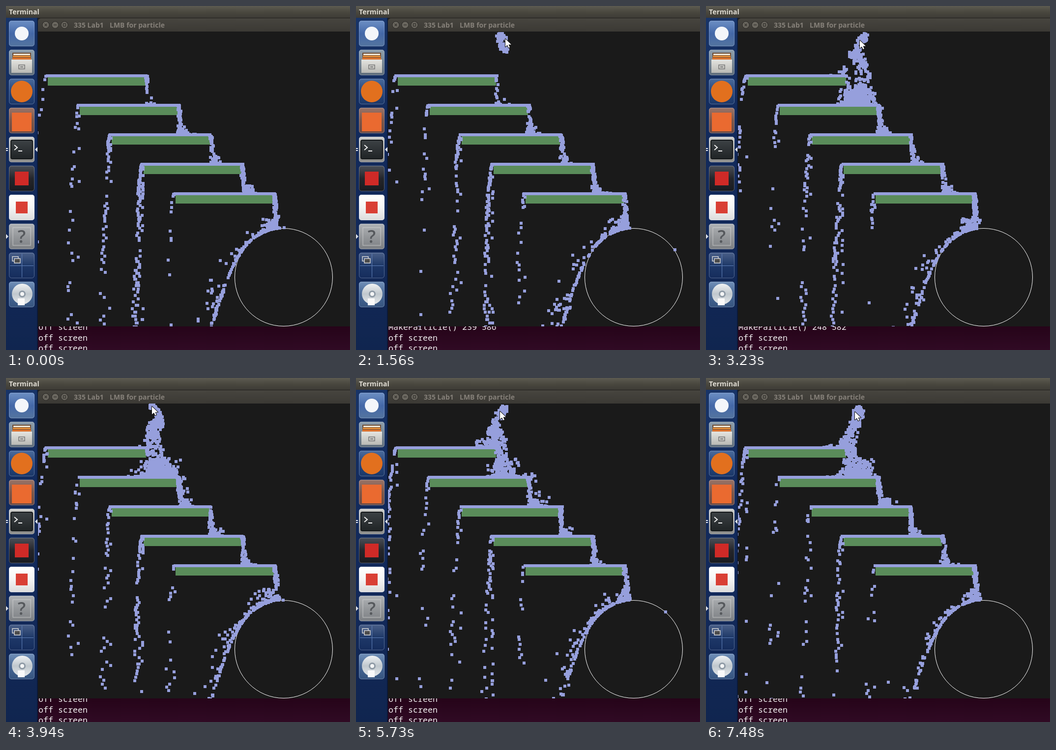
Animation of 700 by 700 pixels, one loop 7.52 s. Source, as an HTML page with a canvas:

```html
<!DOCTYPE html>
<html lang="en">
<head>
<meta charset="utf-8">
<title>Particle waterfall</title>
<style>
html, body { margin: 0; width: 100%; height: 100%; overflow: hidden; background: #1a1a1a; }
canvas { display: block; }
</style>
</head>
<body>
<canvas id="stage" width="700" height="700"></canvas>
<script>
const LOOP = 7520, FRAMES = 126, STEP = 59.84;
const UI = '"Open Sans", "Noto Sans", sans-serif';
const MONO = '"Noto Sans Mono", "DejaVu Sans Mono", monospace';
const WATER = '#969fdc';
const ctx = document.getElementById('stage').getContext('2d');

// ---------- helpers ----------
let seed = 335;
function rnd(a = 0, b = 1) {
  seed = (seed + 0x6D2B79F5) | 0;
  let t = Math.imul(seed ^ (seed >>> 15), 1 | seed);
  t = (t + Math.imul(t ^ (t >>> 7), 61 | t)) ^ t;
  return a + (b - a) * (((t ^ (t >>> 14)) >>> 0) / 4294967296);
}
const mix = (a, b, u) => a + (b - a) * u;
const clamp = u => Math.max(0, Math.min(1, u));
function rect(g, x, y, w, h, fill) { g.fillStyle = fill; g.fillRect(x, y, w, h); }
function disc(g, x, y, r, fill) {
  g.fillStyle = fill;
  g.beginPath(); g.arc(x, y, r, 0, 7); g.fill();
}
function poly(g, pts, fill) {
  g.fillStyle = fill;
  g.beginPath();
  pts.forEach(([x, y]) => g.lineTo(x, y));
  g.closePath(); g.fill();
}
function fade(g, y0, y1, ...colors) {
  const f = g.createLinearGradient(0, y0, 0, y1);
  colors.forEach((c, i) => f.addColorStop(i / (colors.length - 1), c));
  return f;
}
function text(g, s, x, y, font, fill) {
  g.font = font; g.fillStyle = fill; g.fillText(s, x, y);
}

// ---------- scene ----------
// particles per frame over each edge, at the start and end of the loop
const flows = [
  { left: [0.6, 3], right: [1.2, 1.5] },
  { left: [1.2, 0.7], right: [8, 8] },
  { left: [2.5, 0.9], right: [4, 6] },
  { left: [6, 1.6], right: [7, 6] },
  { left: [0.9, 0.5], right: [9, 6] }
];
const boxes = flows.map((flow, i) => ({ ...flow, l: 85 + 65 * i, r: 285 + 65 * i, top: 142 + 60 * i }));
const ball = { x: 565, y: 552, r: 99.5 };

// pointer tip: frame, x, y; it sways between these points while pouring
const POUR_FROM = 22;
const path = [
  [10, 303, -20], [14, 303, 0], [POUR_FROM, 303, 75], [38, 307, 93],
  [54, 313, 70], [78, 281, 98], [96, 293, 68], [125, 303, 69]
];
function pointer(f) {
  const i = Math.max(1, path.findIndex(p => p[0] >= f));
  const [f0, x0, y0] = path[i - 1], [f1, x1, y1] = path[i];
  const u = clamp((f - f0) / (f1 - f0));
  const p = { x: mix(x0, x1, u), y: mix(y0, y1, u) };
  if (f > POUR_FROM) {
    p.x -= 11 * Math.sin(4 * Math.PI * u);
    p.y = Math.max(58, p.y - 26 * Math.sin(3 * Math.PI * u) ** 2);
  }
  return p;
}

// ---------- simulation, recorded once ----------
const SUB = 4, DT = 1 / SUB, GRAVITY = 1.35;
let drops = [];

function spawn(rate, make) {
  for (let n = Math.floor(rate * DT + rnd()); n > 0; n--) drops.push(make());
}
const surge = (i, f) => 1 + 0.45 * Math.sin(f * 0.53 + i * 2.1) + 0.35 * Math.sin(f * 1.37 + i * 4.3);

function emit(f) {
  const u = clamp(f / FRAMES);
  boxes.forEach((b, i) => {
    const y = b.top + 0.2;
    const drift = (i ? 0.65 : 1.05) + 0.15 * Math.sin(f * 0.31 + i);
    spawn(mix(...b.left, u) * surge(i, f), () => {
      const stray = rnd() < 0.15;
      return { x: b.l - (stray ? 1 : 3), y, vx: stray ? rnd(-0.15, 0) : -drift + rnd(-0.3, 0.3), vy: 0 };
    });
    const push = 0.55 + 0.2 * Math.sin(f * 0.23 + i * 1.7);
    spawn(mix(...b.right, u) * surge(i + 5, f), () =>
      ({ x: b.r + rnd(-2, 2.5), y, vx: push + rnd(-0.45, 0.45), vy: 0 }));
  });
  if (f >= POUR_FROM) {
    const p = pointer(f);
    spawn(28, () => ({
      x: p.x + rnd(-4, 4), y: p.y + rnd(-4, 4),
      vx: rnd(-1.3, 1.4), vy: rnd(-0.8, 0.8), poured: true
    }));
  }
}

function hitBox(p, b) {
  p.y = b.top;
  p.vy *= -rnd(0.12, 0.54);
  p.vx += p.poured ? rnd(-1.9, 1.7) : rnd(-0.4, 1.6);
  return p.vy < -1.5;
}

function hitBall(p) {
  const dx = p.x - ball.x, dy = p.y - ball.y, d = Math.hypot(dx, dy);
  if (d >= ball.r + 1) return;
  const nx = dx / d, ny = dy / d, vn = p.vx * nx + p.vy * ny;
  p.x = ball.x + nx * (ball.r + 1);
  p.y = ball.y + ny * (ball.r + 1);
  if (vn >= 0) return;
  const k = (1 + rnd(0.15, 0.62)) * vn;
  p.vx -= k * nx;
  p.vy -= k * ny;
  if (vn < -2) p.vx += rnd(-1.5, 1);
}

function move(p) {
  const y0 = p.y;
  p.vy += GRAVITY * DT;
  p.x += p.vx * DT;
  p.y += p.vy * DT;
  const b = boxes.find(b => y0 <= b.top && p.y > b.top && p.x > b.l - 3 && p.x < b.r + 3);
  if (b && !hitBox(p, b)) return false;
  hitBall(p);
  return p.y < 656 && p.x > 61 && p.x < 704;
}

const film = [];
for (let f = -80; f < FRAMES; f++) {
  for (let s = 1; s <= SUB; s++) {
    emit(f - 1 + s * DT);
    drops = drops.filter(move);
  }
  if (f >= 0) film.push(drops.map(p => [Math.round(p.x) - 3, Math.round(p.y) - 3]));
}

// ---------- desktop ----------
function tile(g, y, ...colors) {
  g.beginPath(); g.roundRect(6, y, 52, 52, 5);
  g.fillStyle = fade(g, y, y + 52, ...colors); g.fill();
  g.strokeStyle = 'rgba(200,215,240,.35)';
  g.lineWidth = 1;
  g.beginPath(); g.roundRect(6.5, y + 0.5, 51, 51, 5); g.stroke();
}

function launcher(g) {
  rect(g, 0, 24, 65, 676, fade(g, 24, 700, '#183468', '#122a5c', '#12295a', '#10254f'));
  rect(g, 63, 24, 2, 676, 'rgba(5,12,30,.5)');

  tile(g, 30, '#6d8fc4', '#4468a8', '#54749f');
  disc(g, 32, 56, 14, '#f4f6fa');

  tile(g, 89, '#8fa0ae', '#768694', '#5f6d7a');
  rect(g, 13, 95, 38, 14, '#6a4a34');
  rect(g, 15, 97, 34, 3, '#f3ead9');
  rect(g, 14, 101, 36, 3, '#e8913c');
  rect(g, 13, 105, 38, 4, '#d9722f');
  rect(g, 11, 109, 42, 27, fade(g, 109, 136, '#e4e4e0', '#b9b9b4'));
  g.strokeStyle = '#777';
  g.lineWidth = 1.5;
  g.strokeRect(26, 120, 12, 8);
  rect(g, 29, 123, 6, 2, '#777');

  tile(g, 148, '#4c6c9c', '#27467c', '#1c3868');
  disc(g, 32, 174, 22, '#e2701e');

  tile(g, 207, '#9a7468', '#7d5648', '#6a4a44');
  rect(g, 12, 217, 40, 38, '#ea6a30');

  tile(g, 266, '#d0d0ce', '#a9a9a6', '#8c8c8a');
  g.beginPath(); g.roundRect(10, 273, 44, 38, 3);
  g.fillStyle = fade(g, 273, 311, '#3c4144', '#202426'); g.fill();
  g.strokeStyle = '#15181a'; g.lineWidth = 2; g.stroke();
  g.strokeStyle = '#f2f2f2';
  g.beginPath();
  g.moveTo(17, 283); g.lineTo(23, 288); g.lineTo(17, 293);
  g.moveTo(25, 295); g.lineTo(33, 295);
  g.stroke();

  tile(g, 325, '#4b4f58', '#24262b', '#191b20');
  rect(g, 18, 337, 28, 28, '#cf2a27');

  tile(g, 384, '#ffffff', '#f4f4f4', '#dcdcdc');
  rect(g, 20, 398, 24, 24, '#d93f35');

  tile(g, 443, '#b0b3b6', '#95989b', '#7c7f83');
  g.textAlign = 'center';
  text(g, '?', 32, 482, '600 36px ' + UI, '#56595d');
  g.textAlign = 'left';
  g.strokeStyle = 'rgba(220,220,220,.5)';
  g.lineWidth = 1.5;
  g.strokeRect(14, 451, 36, 36);

  tile(g, 502, '#4a5f88', '#1e3868', '#152c5c');
  rect(g, 32, 504, 1, 48, '#5f80b8');
  rect(g, 8, 528, 48, 1, '#5f80b8');
  g.strokeStyle = '#d8d8d8';
  g.lineWidth = 1.5;
  g.strokeRect(13, 510, 12, 9);
  rect(g, 17, 514, 12, 9, '#4c4c4c');
  g.strokeRect(17, 514, 12, 9);

  tile(g, 561, '#7190b8', '#466694', '#37557f');
  disc(g, 33, 586, 21, fade(g, 565, 607, '#f0f2f4', '#bfc7cd', '#e6eaec'));
  disc(g, 33, 586, 7, '#8d99a5');
  disc(g, 33, 586, 4, '#f4f5f6');
  rect(g, 24, 595, 14, 14, '#fafafa');

  poly(g, [[64, 287], [64, 297], [59, 292]], '#e4e8f0');
  rect(g, 0, 289, 4, 2, '#e4e8f0');
  rect(g, 0, 293, 4, 2, '#e4e8f0');
  poly(g, [[0, 464], [5, 469], [0, 474]], '#d5dae4');
}

function windowFrame(g) {
  rect(g, 65, 24, 635, 28, '#22201d');
  g.beginPath(); g.roundRect(65, 25, 650, 40, [6, 0, 0, 0]);
  g.fillStyle = fade(g, 25, 52, '#47453f', '#3b3934'); g.fill();
  [81, 100, 119].forEach((x, i) => {
    disc(g, x, 38.5, 7.5, '#2f2d2a');
    disc(g, x, 38.5, 6.5, '#6a675f');
    g.strokeStyle = '#35332f';
    g.lineWidth = 1.4;
    g.beginPath();
    if (i === 0) {
      g.moveTo(x - 2.5, 36); g.lineTo(x + 2.5, 41);
      g.moveTo(x + 2.5, 36); g.lineTo(x - 2.5, 41);
    } else if (i === 1) {
      g.moveTo(x - 3, 38.5); g.lineTo(x + 3, 38.5);
    } else {
      g.rect(x - 2.5, 36, 5, 5);
    }
    g.stroke();
  });
  text(g, '335 Lab1', 138, 44, 'bold 14px ' + UI, '#858079');
  text(g, 'LMB for particle', 211, 44, 'bold 14px ' + UI, '#858079');
  rect(g, 65, 52, 635, 600, '#1a1a1a');
  boxes.forEach(b => rect(g, b.l, b.top, 200, 20, '#5a8c5a'));
}

const desktop = document.createElement('canvas');
desktop.width = desktop.height = 700;
const dg = desktop.getContext('2d');
rect(dg, 0, 0, 700, 24, fade(dg, 0, 24, '#5d5b51', '#4a483f', '#3d3b36'));
launcher(dg);
windowFrame(dg);
rect(dg, 65, 652, 635, 48, fade(dg, 652, 700, '#260419', '#300a24'));

// ---------- per-frame parts ----------
function menu(f) {
  const a = clamp(Math.min((f - 9) / 3, (21 - f) / 3));
  const g = ctx.createLinearGradient(50, 0, 69, 0);
  g.addColorStop(0, '#dfdbd2');
  g.addColorStop(1, `rgba(223,219,210,${1 - a})`);
  text(ctx, 'Terminal', 6, 17, 'bold 14px ' + UI, g);
  if (!a) return;
  ctx.globalAlpha = a;
  [['File', 71], ['Edit', 107], ['View', 146], ['Search', 191], ['Terminal', 248], ['Help', 319]]
    .forEach(([s, x]) => text(ctx, s, x, 17, '14.5px ' + UI, '#dfdbd2'));
  ctx.globalAlpha = 1;
}

function log(f) {
  const p = pointer(f), pouring = f >= POUR_FROM;
  const made = `MakeParticle() ${Math.round(p.x - 65)} ${Math.round(652 - p.y)}`;
  const shows = [Math.abs(f % 16 - 8) < 4, f % 24 === 12, f % 40 === 30];
  ctx.save();
  ctx.beginPath(); ctx.rect(65, 652, 635, 48); ctx.clip();
  shows.forEach((on, i) =>
    text(ctx, on && pouring ? made : 'off screen', 66, 659 + 21.7 * i, '16.67px ' + MONO, '#f4f2f3'));
  ctx.restore();
}

function water(f) {
  ctx.save();
  ctx.beginPath(); ctx.rect(65, 52, 635, 600); ctx.clip();
  ctx.strokeStyle = '#fff';
  ctx.lineWidth = 1;
  ctx.beginPath(); ctx.arc(ball.x, ball.y, ball.r, 0, 7); ctx.stroke();
  boxes.forEach(b => rect(ctx, b.l - 4, b.top - 3, 207, 6, WATER));
  film[f].forEach(([x, y]) => rect(ctx, x, y, 6, 6, WATER));
  ctx.restore();
}

function arrow(f) {
  if (f < path[0][0]) return;
  const { x, y } = pointer(f);
  ctx.save();
  ctx.translate(Math.round(x), Math.round(y));
  ctx.beginPath();
  [[0, 0], [0, 16], [4, 12.5], [6.5, 18], [9, 17], [6.5, 11.5], [12, 11.5]].forEach(([a, b]) => ctx.lineTo(a, b));
  ctx.closePath();
  ctx.lineJoin = 'round';
  ctx.lineWidth = 2;
  ctx.strokeStyle = '#111';
  ctx.stroke();
  ctx.fillStyle = '#fff';
  ctx.fill();
  ctx.restore();
}

function draw(now) {
  const f = Math.min(FRAMES - 1, Math.floor((now % LOOP) / STEP + 0.3));
  ctx.drawImage(desktop, 0, 0);
  menu(f);
  water(f);
  log(f);
  arrow(f);
}

const start = performance.now();
function tick() {
  draw(performance.now() - start);
  requestAnimationFrame(tick);
}
tick();
</script>
</body>
</html>
```
